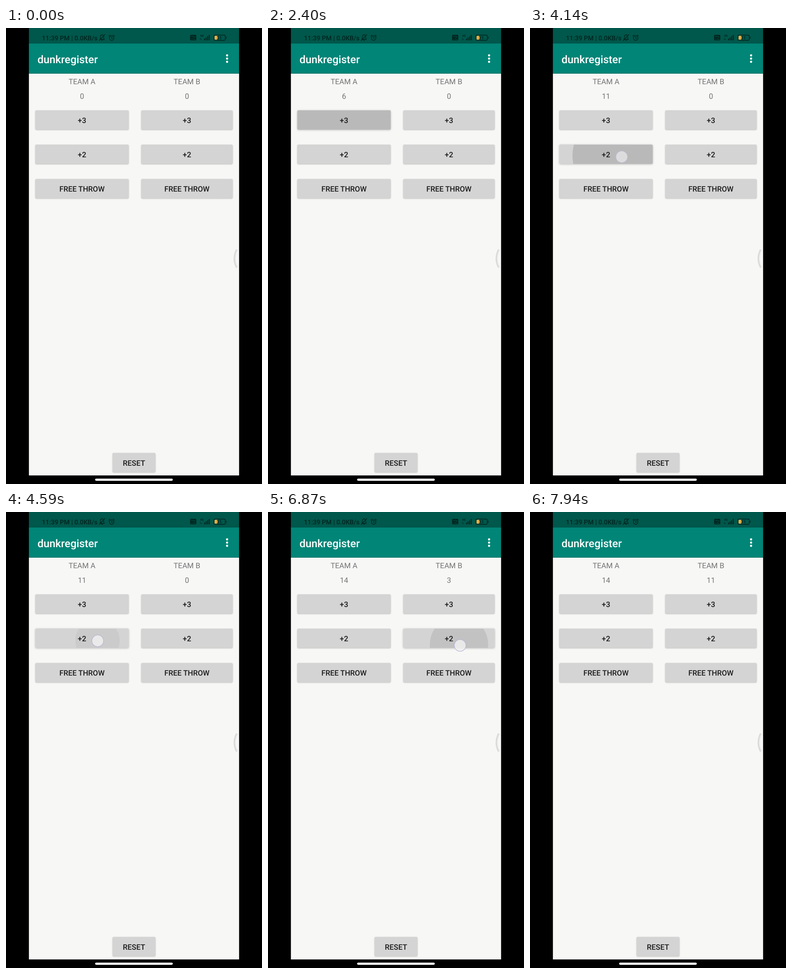
An HTML page with a canvas for the animation above (7.99 s loop, 561x998 px).

```html
<!DOCTYPE html>
<html lang="en">
<head>
<meta charset="utf-8">
<title>Score counter</title>
<style>
html, body { margin: 0; width: 100%; height: 100%; overflow: hidden; background: #000; }
canvas { display: block; width: 561px; height: 998px; }
</style>
</head>
<body>
<canvas id="stage"></canvas>
<script>
const W = 561, H = 998, LOOP = 7990;
const HOLD = 185, DOT_END = 260, GROW = 300, FADE_FROM = 325, FADE_TO = 410;
// Phone screen inside the stage; DP is one density-independent pixel
const LEFT = 50.2, WIDE = 460.6, DP = 1.173;
const BODY = 14 * DP, TITLE = 20 * DP, BTN_H = 36 * DP;
const canvas = document.getElementById('stage');
const ctx = canvas.getContext('2d');
const dpr = window.devicePixelRatio || 1;
canvas.width = W * dpr;
canvas.height = H * dpr;

const teams = [
  { name: 'TEAM A', x: 64.3, w: 204.6, mid: 166.6 },
  { name: 'TEAM B', x: 296.4, w: 200.3, mid: 396.5 }
];
const rows = [
  { label: '+3', y: 180.2, points: 3 },
  { label: '+2', y: 255.3, points: 2 },
  { label: 'FREE THROW', y: 330.4, points: 1 }
];
// Each tap: time, team, row, touch point
const taps = [
  [1146, 0, 0, 204, 207], [2090, 0, 0, 204, 207], [3026, 0, 0, 205, 207],
  [3900, 0, 1, 201, 282], [4520, 0, 1, 201, 282], [5135, 0, 2, 202, 357],
  [5980, 1, 0, 424, 209],
  [6732, 1, 1, 421, 292], [6995, 1, 1, 421, 292], [7258, 1, 1, 421, 291], [7520, 1, 1, 421, 292]
].map(([at, team, row, x, y]) => ({ at, team, row, x, y }));

const clamp = v => Math.max(0, Math.min(1, v));
const mix = (a, b, p) => a + (b - a) * p;

function rect(x, y, w, h, color, r = 0) {
  ctx.fillStyle = color;
  ctx.beginPath();
  ctx.roundRect(x, y, w, h, r);
  ctx.fill();
}

function disc(x, y, r, color) {
  ctx.fillStyle = color;
  ctx.beginPath();
  ctx.arc(x, y, r, 0, Math.PI * 2);
  ctx.fill();
}

function line(path, color, width) {
  ctx.strokeStyle = color;
  ctx.lineWidth = width;
  ctx.stroke(new Path2D(path));
}

function text(str, x, y, size, weight, color, align = 'center') {
  ctx.font = `${weight} ${size}px Roboto, sans-serif`;
  ctx.textRendering = 'geometricPrecision';
  ctx.textAlign = align;
  ctx.fillStyle = color;
  ctx.fillText(str, x, y);
}

function statusBar() {
  const ink = '#00251f';
  text('11:39 PM | 0.0KB/s', 78.8, 26.5, 14.1, 500, ink, 'left');
  // Muted bell
  line('M205 25H216M206 25Q207 23 207 19Q207 15 210.5 15Q214 15 214 19Q214 23 215 25M209 27H212M204 28L217 14', ink, 1.3);
  // Alarm clock
  line('M226.5 22a5 5 0 1 0 10 0a5 5 0 1 0 -10 0M231.5 19V22.5H234M225 18L228.5 15M238 18L234.5 15', ink, 1.3);
  // Call badge
  rect(403.5, 15, 13.5, 12, ink, 2);
  line('M406 17L408 20L410 17M412 17V20H415M406 24.5H409M411 22V25H415', '#00574b', 1);
  // Signal
  text('4G', 425.5, 19, 6, 700, ink, 'left');
  line('M426 22V26M428.5 24V26', ink, 1);
  for (let i = 0; i < 4; i++) rect(434 + i * 3.5, 23 - i * 2.6, 2, 4 + i * 2.6, ink);
  // Battery
  line('M458 15.5H478Q480.5 15.5 480.5 18V24.5Q480.5 27 478 27H458Q455.5 27 455.5 24.5V18Q455.5 15.5 458 15.5M482.5 19V23.5', ink, 1.3);
  rect(457, 17, 7, 8.5, '#e9ae45', 1.5);
  text('31', 467.5, 25, 10, 500, ink);
}

function ripple(tap, age, team, row) {
  const p = clamp(age / GROW);
  const reach = Math.hypot(team.w, BTN_H) / 2;
  const x = mix(tap.x, team.mid, p ** 3);
  const y = mix(tap.y, row.y + BTN_H / 2, p ** 3);
  const fade = 1 - clamp((age - FADE_FROM) / (FADE_TO - FADE_FROM));
  ctx.save();
  ctx.beginPath();
  ctx.roundRect(team.x, row.y, team.w, BTN_H, 2 * DP);
  ctx.clip();
  disc(x, y, reach * (0.3 + 0.7 * p), `rgba(0,0,0,${0.13 * clamp(age / 210) * fade})`);
  ctx.restore();
}

// lift: 0 at rest, 1 when pressed
function button(x, y, w, lift = 0) {
  ctx.save();
  ctx.shadowColor = 'rgba(0,0,0,.25)';
  ctx.shadowBlur = (2.5 + 1.5 * lift) * dpr;
  ctx.shadowOffsetY = 0.8 * dpr;
  rect(x, y, w, BTN_H, '#d4d4d4', 2 * DP);
  ctx.restore();
}

function touchDot({ x, y }, age) {
  ctx.globalAlpha = 1 - 0.35 * clamp((age - HOLD) / (DOT_END - HOLD));
  disc(x, y, 13, 'rgba(240,240,240,.85)');
  ctx.strokeStyle = 'rgba(178,178,212,.85)';
  ctx.lineWidth = 1.3;
  ctx.beginPath();
  ctx.arc(x, y, 12.8, 0, Math.PI * 2);
  ctx.stroke();
  ctx.globalAlpha = 1;
}

function draw(t) {
  ctx.setTransform(dpr, 0, 0, dpr, 0, 0);
  rect(0, 0, W, H, '#000');
  rect(LEFT, 99.8, WIDE, 879.4, '#f7f7f6');
  rect(LEFT, 0, WIDE, 34.1, '#00574b');
  rect(LEFT, 34.1, WIDE, 65.7, '#008577');
  statusBar();
  text('dunkregister', LEFT + 16 * DP, 76.5, TITLE, 500, '#fff', 'left');
  for (const y of [60, 67, 74]) disc(484.5, y, 2.4, '#fff');

  teams.forEach((team, i) => {
    const score = taps.reduce((sum, tap) =>
      sum + (tap.team === i && t >= tap.at + HOLD ? rows[tap.row].points : 0), 0);
    text(team.name, team.mid, 122.5, BODY, 400, '#747474');
    text(score, team.mid, 154.5, BODY, 400, '#747474');
    rows.forEach((row, j) => {
      const live = taps.filter(tap =>
        tap.team === i && tap.row === j && t >= tap.at && t < tap.at + FADE_TO);
      button(team.x, row.y, team.w, live.length ? 1 : 0);
      for (const tap of live) ripple(tap, t - tap.at, team, row);
      text(row.label, team.mid, row.y + 27.5, BODY, 500, '#1b1b1b');
    });
  });

  button(233.6, 930, 80 * DP);
  text('RESET', 280.5, 957.5, BODY, 500, '#1b1b1b');

  // Edge handle
  line('M506 485Q496 505 506 524', '#dadada', 4.5);
  line('M507 486Q498 505 507 523', '#f0f0f0', 1.2);
  rect(195.3, 986.2, 170.2, 4.8, '#fff', 2.4);

  for (const tap of taps) {
    const age = t - tap.at;
    if (age >= 0 && age < DOT_END) touchDot(tap, age);
  }
}

const start = performance.now();
function tick() {
  draw((performance.now() - start) % LOOP);
  requestAnimationFrame(tick);
}
tick();
</script>
</body>
</html>
```
